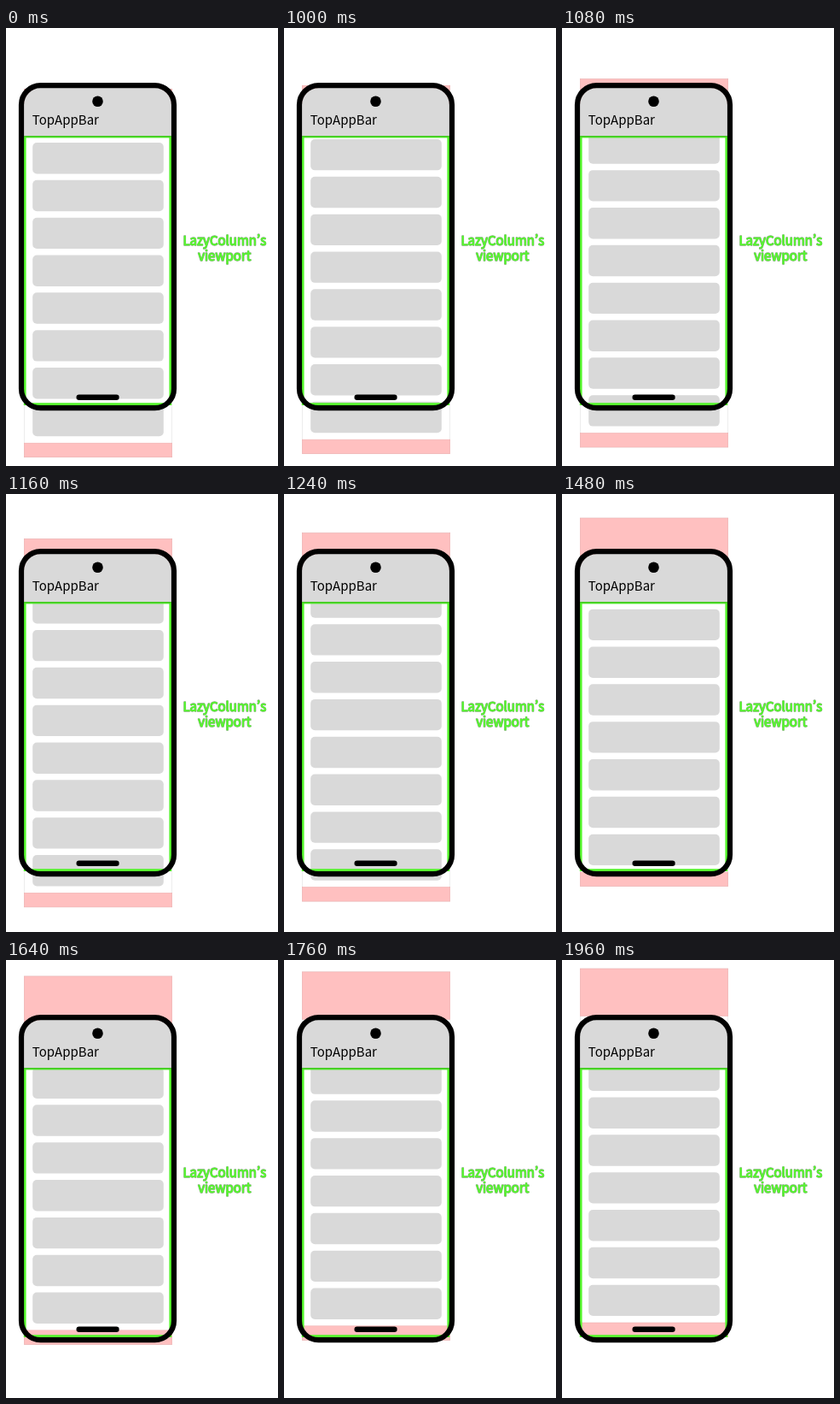
Recreate the animation shown at these times as an HTML page. Size 319 by 512 pixels, loop 2.04 s.

```html
<!DOCTYPE html>
<html lang="ja">
<head>
<meta charset="utf-8">
<title>LazyColumn content padding</title>
<style>
  html, body { margin: 0; width: 100%; height: 100%; overflow: hidden; background: #fff; }
  svg { display: block; width: 319px; height: 512px; }
  text { font: 15px "Noto Sans CJK JP", "Noto Sans", sans-serif; }
  .label { text-anchor: middle; fill: #55f82c; stroke-linejoin: round; }
  .edge { stroke: #8f9f8c; stroke-width: 1.4; }
  .face { stroke: #55f82c; stroke-width: .7; }
  .pad { fill: #ffc0c0; stroke: #eeb0b0; stroke-width: .6; }
  .card { fill: #d9d9d9; }
  .bar { fill: #d9d9d9; filter: drop-shadow(0 1.5px 1.2px rgba(0, 0, 0, .3)); }
</style>
</head>
<body>
<svg viewBox="0 0 319 512">
  <defs>
    <g id="label">
      <text x="256.3" y="254">LazyColumn’s</text>
      <text x="256.3" y="272">viewport</text>
    </g>
  </defs>

  <path d="M41 70H174A20 20 0 0 1 194 90V421A20 20 0 0 1 174 441H41A20 20 0 0 1 21 421V90A20 20 0 0 1 41 70Z" fill="#fff"/>
  <g id="column">
    <rect x="21.3" y="71.3" width="173.4" height="430.4" fill="#fff" stroke="#e2e2e2" stroke-width=".6"/>
    <rect class="pad" x="21.3" y="71.3" width="173.4" height="55.4"/>
    <rect class="pad" x="21.3" y="485.2" width="173.4" height="16.5"/>
  </g>

  <rect x="22.2" y="127" width="170.6" height="312.6" fill="none" stroke="#55f82c" stroke-width="2.8"/>
  <path class="bar" d="M21 126V90A20 20 0 0 1 41 70H174A20 20 0 0 1 194 90V126Z"/>
  <text x="30.8" y="113">TopAppBar</text>

  <rect x="18" y="67.2" width="179" height="377" rx="22.5" fill="none" stroke="#000" stroke-width="6.2"/>
  <circle cx="107.5" cy="85.8" r="6.3"/>
  <rect x="82.5" y="428.6" width="50.2" height="6.4" rx="3.2"/>

  <use href="#label" class="label edge"/>
  <use href="#label" class="label face"/>
</svg>
<script>
  const LOOP = 2040, START = 1000, TICK = 40, STEPS = 25, DISTANCE = 61.2;
  const column = document.getElementById("column");

  for (let i = 0; i < 8; i++) {
    const card = document.createElementNS("http://www.w3.org/2000/svg", "rect");
    const box = { class: "card", x: 31.2, y: 134 + i * 43.84, width: 153.6, height: 36.4, rx: 5 };
    for (const key in box) card.setAttribute(key, box[key]);
    column.append(card);
  }

  // cubic-bezier(0, 0, .58, 1), solved by bisection
  function easeOut(x) {
    let lo = 0, hi = 1;
    for (let i = 0; i < 30; i++) {
      const s = (lo + hi) / 2;
      if (1.74 * s * s - 0.74 * s ** 3 < x) lo = s; else hi = s;
    }
    return 3 * lo * lo - 2 * lo ** 3;
  }

  const begin = performance.now();

  function draw() {
    const t = Math.max(0, performance.now() - begin) % LOOP;
    const step = t < START ? 0 : Math.min(STEPS, Math.floor((t - START) / TICK) + 1);
    const y = DISTANCE * easeOut(step / STEPS);
    column.setAttribute("transform", `translate(0 ${-y.toFixed(2)})`);
    requestAnimationFrame(draw);
  }
  draw();
</script>
</body>
</html>
```
